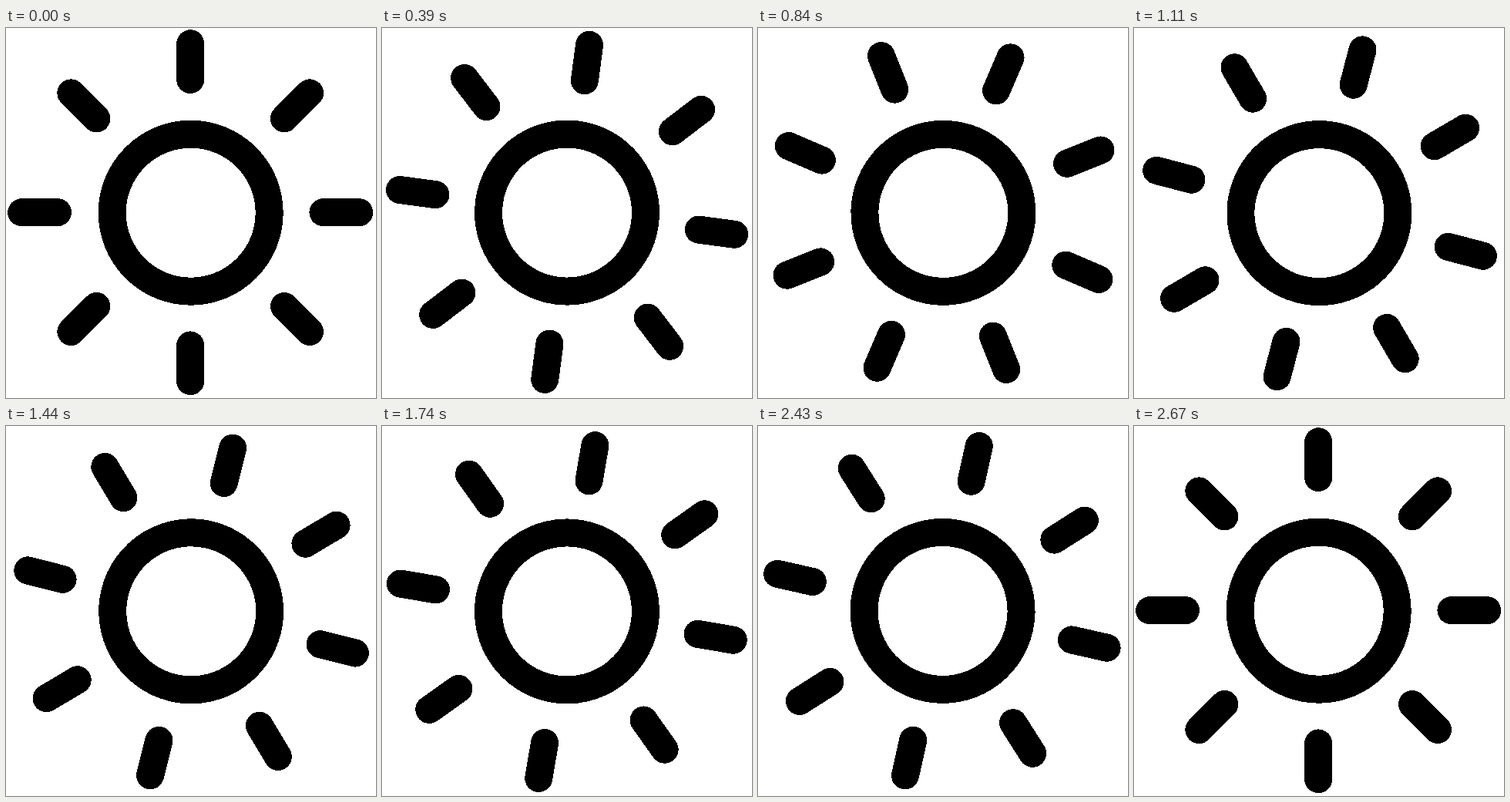
These frames come from a looping animation (480 by 480 pixels, 2700 ms). An HTML page:

```html
<!DOCTYPE html>
<html lang="en">
<head>
<meta charset="utf-8">
<title>Turning sun</title>
<style>
  html, body { margin: 0; width: 100%; height: 100%; overflow: hidden; background: #fff; }
  svg { display: block; width: 100%; height: 100%; }
</style>
</head>
<body>
<svg viewBox="0 0 480 480" shape-rendering="crispEdges">
  <g id="sun" fill="none" stroke="#000" stroke-width="36" stroke-linecap="round">
    <circle cx="239.7" cy="239.7" r="102"/>
  </g>
</svg>
<script>
  const LOOP = 2700, TICK = 30, STEPS = LOOP / TICK;
  const MID = 239.2, INNER = 172.2, OUTER = 219, RAYS = 8;
  const sun = document.getElementById('sun');

  for (let i = 0; i < RAYS; i++) {
    const ray = document.createElementNS('http://www.w3.org/2000/svg', 'line');
    const a = i * 2 * Math.PI / RAYS;
    const set = (n, r) => {
      ray.setAttribute('x' + n, MID + r * Math.sin(a));
      ray.setAttribute('y' + n, MID - r * Math.cos(a));
    };
    set(1, INNER);
    set(2, OUTER);
    sun.appendChild(ray);
  }

  // One full turn in even steps; the last step rests on the starting pose.
  function draw(ms) {
    const step = Math.floor((ms % LOOP) / TICK) % (STEPS - 1);
    sun.setAttribute('transform', `rotate(${step * 360 / (STEPS - 1)} 240 240)`);
  }

  const start = performance.now();
  function loop() {
    draw(performance.now() - start);
    requestAnimationFrame(loop);
  }
  draw(0);
  requestAnimationFrame(loop);
</script>
</body>
</html>
```
